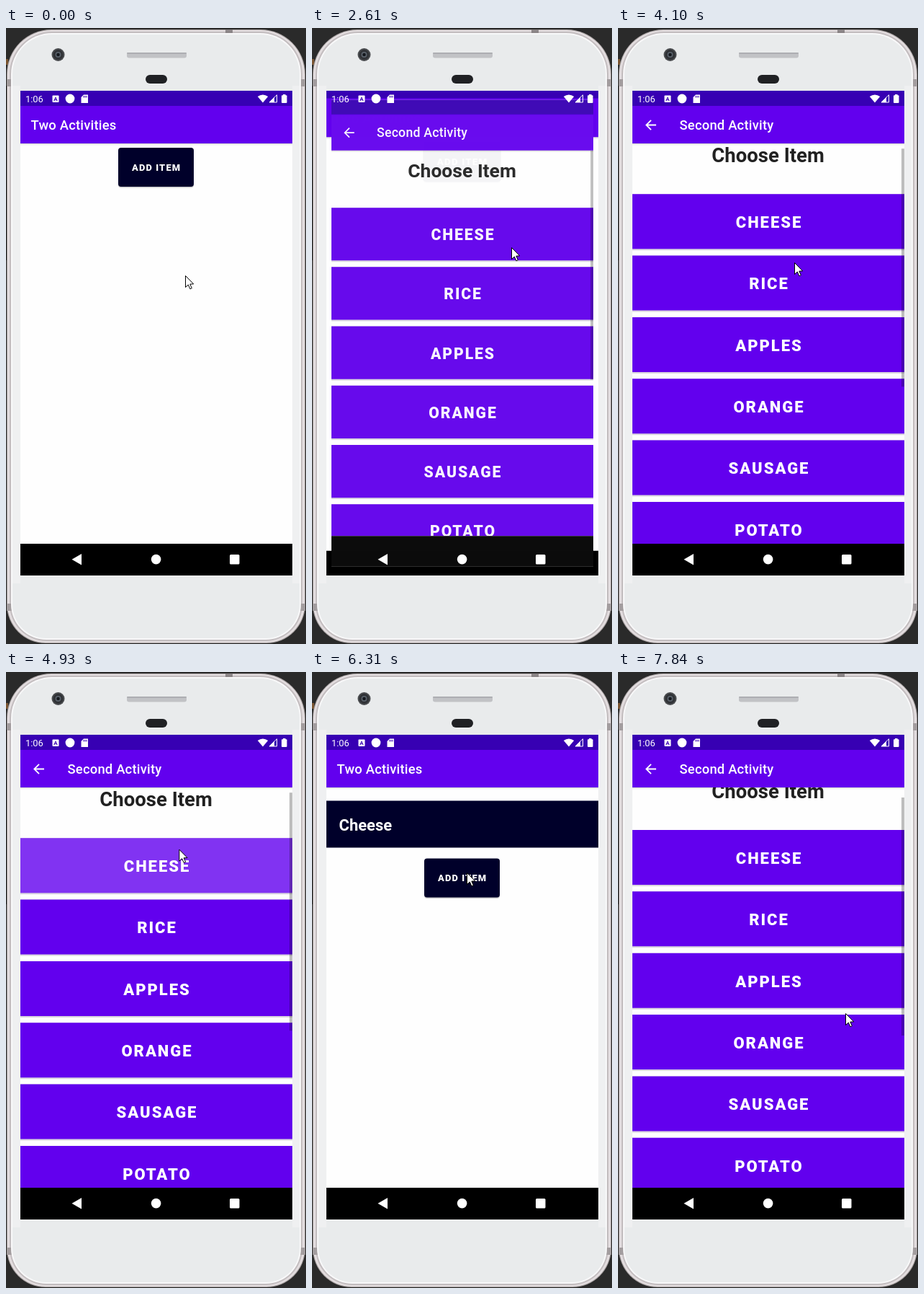
An HTML page with a canvas for the animation above (7.99 s loop, 417 by 854 pixels).

```html
<!DOCTYPE html>
<html lang="en">
<head>
<meta charset="utf-8">
<title>Two Activities</title>
<style>
html, body { margin: 0; width: 100%; height: 100%; overflow: hidden; background: #2a2a2a; }
canvas { display: block; width: 417px; height: 854px; }
</style>
</head>
<body>
<canvas id="stage" width="417" height="854"></canvas>
<script>
const ctx = document.getElementById('stage').getContext('2d');
const LOOP = 7990;
const STEP = 135; // the screen refreshes about this often, in ms
const PURPLE = '#6200ee', DARK_PURPLE = '#3700b3', NAVY = '#00002a', RIPPLE = 'rgba(255,255,255,.2)';
const ITEMS = ['CHEESE', 'RICE', 'APPLES', 'ORANGE', 'SAUSAGE', 'POTATO', 'TOMATO'];

const START = { x: 249, y: 343, scroll: 0 };
const MOVES = [
  { from: 140, to: 420, x: 298, y: 345 },
  { from: 560, to: 700, x: 170, y: 170 },
  { from: 840, to: 980, x: 219, y: 205 },
  { from: 1270, to: 1410, x: 219, y: 200 },
  { from: 2340, to: 2610, x: 277, y: 304 },
  { from: 3440, to: 4100, x: 245, y: 325, scroll: 12.3 },
  { from: 4230, to: 4630, x: 233, y: 247 },
  { from: 4930, to: 5210, x: 255, y: 243 },
  { from: 5350, to: 5910, x: 73, y: 203, scroll: 0 },
  { from: 6030, to: 6310, x: 215, y: 278 },
  { from: 6610, to: 6880, x: 250, y: 433 },
  { from: 7020, to: 7570, x: 214, y: 263, scroll: 23.5 },
  { from: 7690, to: 7840, x: 316, y: 473 },
];

// `age` is how far the transition has run when it first becomes visible
const TRANSITIONS = [
  { shown: 2475 + STEP, age: 96, opens: true },
  { shown: 5070, age: 45, opens: false },
  { shown: 6880 - STEP, age: 59, opens: true },
];

const clamp = v => Math.max(0, Math.min(1, v));

// Cursor and scroll position, advancing in whole refresh steps
function pointerAt(t) {
  const state = { ...START };
  for (const { from, to, ...goal } of MOVES) {
    if (t < from) break;
    const count = Math.round((to - from) / STEP);
    const step = Math.floor((t - from) / (to - from) * count + .01);
    const f = Math.min(1, (step + 1) / (count + 1));
    for (const key in goal) state[key] += (goal[key] - state[key]) * f;
  }
  return state;
}

// Fast-out, extra-slow-in: two joined cubic curves
function ease(x) {
  if (x <= 0 || x >= 1) return clamp(x);
  const [xs, ys] = x < 1 / 6
    ? [[0, .05, .1333, 1 / 6], [0, 0, .06, .4]]
    : [[1 / 6, .2083, .25, 1], [.4, .82, 1, 1]];
  const cubic = (p, u) => p[0] * (1 - u) ** 3 + 3 * p[1] * u * (1 - u) ** 2
    + 3 * p[2] * u * u * (1 - u) + p[3] * u ** 3;
  let lo = 0, hi = 1;
  for (let i = 0; i < 24; i++) {
    const mid = (lo + hi) / 2;
    if (cubic(xs, mid) < x) lo = mid; else hi = mid;
  }
  return cubic(ys, lo);
}

function rect(x, y, w, h, fill, radius = 0) {
  ctx.fillStyle = fill;
  ctx.beginPath();
  ctx.roundRect(x, y, w, h, radius);
  ctx.fill();
}

function disc(x, y, r, fill) {
  ctx.fillStyle = fill;
  ctx.beginPath();
  ctx.arc(x, y, r, 0, 7);
  ctx.fill();
}

function polygon(points, fill, stroke) {
  ctx.beginPath();
  points.forEach(([x, y]) => ctx.lineTo(x, y));
  ctx.closePath();
  ctx.fillStyle = fill;
  ctx.fill();
  if (stroke) {
    ctx.strokeStyle = stroke;
    ctx.lineWidth = 1;
    ctx.stroke();
  }
}

function text(str, x, y, size, weight, color, spacing = 0, align = 'left') {
  ctx.font = `${weight} ${size}px Roboto, sans-serif`;
  ctx.letterSpacing = spacing + 'px';
  ctx.textAlign = align;
  ctx.fillStyle = color;
  ctx.fillText(str, align === 'center' ? x + spacing / 2 : x, y);
}

function clipTo(x, y, w, h) {
  ctx.beginPath();
  ctx.rect(x, y, w, h);
  ctx.clip();
}

function phone() {
  rect(0, 0, 417, 854, '#2a2a2a');
  rect(0, 80, 1, 242, '#080808');
  rect(0, 43, 3, 8, '#7a5430');
  rect(1, 2, 415, 851, '#a59f9f', [62, 62, 54, 54]);
  rect(2, 3, 413, 849, '#e3dddf', [61, 61, 53, 53]);
  rect(5, 5, 407, 845, '#c3bdbf', [59, 59, 51, 51]);
  rect(305, 2, 10, 6, '#8b8587');
  for (const y of [71, 798]) {
    rect(1, y, 7, 10, '#a39d9f');
    rect(409, y, 7, 10, '#a39d9f');
  }
  rect(7, 7, 403, 841, '#f8f8f9', [57, 57, 49, 49]);
  rect(9, 9, 399, 837, '#e9ebec', [55, 55, 47, 47]);
  rect(9, 80, 11, 690, '#eff0f1');
  rect(398, 80, 10, 690, '#eff0f1');
  rect(168, 34, 83, 7.5, '#c1c2c5', 3);
  rect(168, 34, 83, 2, '#adaeb2', 2);
  rect(194, 65, 30, 12, '#202124', 6);
  disc(72.5, 37, 9, '#4a4c4f');
  disc(72.5, 37, 7, '#303236');
  disc(72.5, 37, 4, '#59616a');
  disc(72.5, 37, 2.3, '#15181d');
}

function appFrame(title, titleX) {
  rect(20, 87, 378, 22, DARK_PURPLE);
  rect(20, 108, 378, 52, PURPLE);
  rect(20, 160, 378, 1, 'rgba(0,0,0,.16)');
  rect(20, 161, 378, 1.5, 'rgba(0,0,0,.05)');
  rect(20, 715, 378, 44, '#000');
  text(title, titleX, 141, 18.4, 500, '#fff', .2);
}

function mainPage(hasItem, pressed) {
  rect(20, 87, 378, 672, '#fefefe');
  const top = hasItem ? 258.4 : 166;
  if (hasItem) {
    rect(20, 178.6, 378, 65, NAVY);
    text('Cheese', 37.5, 219.6, 22, 700, '#fff');
  }
  rect(156, top + 1, 105, 54.5, 'rgba(0,0,0,.2)', 4);
  rect(156, top, 105, 54, NAVY, 4);
  if (pressed) rect(156, top, 105, 54, RIPPLE, 4);
  text('ADD ITEM', 208.5, top + 32, 12.9, 900, '#fff', 1.15, 'center');
  appFrame('Two Activities', 34.5);
}

function listPage(scroll, pressed) {
  rect(20, 87, 378, 672, '#fefefe');
  ctx.save();
  clipTo(20, 160, 378, 555);
  text('Choose Item', 208.5, 198.5 - scroll, 27.5, 700, '#212121', 0, 'center');
  ITEMS.forEach((name, i) => {
    const y = 242.5 - scroll + i * 85.35;
    rect(20, y, 378, 78, '#d9d5de');
    rect(20, y, 378, 76, PURPLE);
    if (pressed && i === 0) rect(20, y, 378, 76, RIPPLE);
    text(name, 209, y + 46.8, 22, 900, '#fff', 1.97, 'center');
  });
  rect(394, 160 + scroll * .595, 4, 330, 'rgba(0,0,0,.26)');
  ctx.restore();
  appFrame('Second Activity', 85.5);
  ctx.strokeStyle = '#fff';
  ctx.lineWidth = 1.8;
  ctx.beginPath();
  ctx.moveTo(53, 134.5);
  ctx.lineTo(39.5, 134.5);
  ctx.moveTo(46, 127.8);
  ctx.lineTo(39.3, 134.5);
  ctx.lineTo(46, 141.2);
  ctx.stroke();
}

function scaled(scale, alpha, draw) {
  ctx.save();
  ctx.globalAlpha = alpha;
  ctx.translate(209, 423);
  ctx.scale(scale, scale);
  ctx.translate(-209, -423);
  clipTo(20, 87, 378, 672);
  draw();
  ctx.restore();
}

function pages(t, scroll) {
  const move = TRANSITIONS.filter(m => m.shown <= t).pop();
  const mainPressed = (t >= 2340 && t < 2700) || (t >= 6610 && t < 6950);
  const main = () => mainPage(t >= 5070, mainPressed);
  const list = () => listPage(scroll, t >= 4930 && t < 5200);
  if (!move) return main();
  const elapsed = move.age + STEP * Math.floor((t - move.shown) / STEP);
  const p = ease(elapsed / 400), fade = clamp((elapsed - 35) / 64);
  if (move.opens) {
    if (p < 1) scaled(1 + .05 * p ** 1.4, 1, main);
    scaled(.85 + .15 * p, fade, list);
  } else {
    scaled(1 + .1 * (1 - p) ** 1.3, 1, main);
    if (fade < 1) scaled(1 - .1 * p, 1 - fade, list);
  }
}

function systemIcons() {
  text('1:06', 27, 103, 12.9, 400, '#fff');
  rect(64.5, 93.5, 9, 9.5, '#fff', 1);
  text('A', 69, 101.3, 8, 700, DARK_PURPLE, 0, 'center');
  disc(89, 98, 6.4, '#fff');
  polygon([[108, 92.5], [114, 92.5], [114, 104], [104.5, 104], [104.5, 96]], '#fff');
  for (const x of [107.5, 109.5, 111.5]) rect(x, 94, 1, 2.5, DARK_PURPLE);
  ctx.fillStyle = '#fff';
  ctx.beginPath();
  ctx.moveTo(357, 103.5);
  ctx.lineTo(349.8, 95);
  ctx.quadraticCurveTo(357, 89.8, 364.2, 95);
  ctx.fill();
  polygon([[376.5, 92.8], [376.5, 103], [366, 103]], 'transparent', '#fff');
  polygon([[373, 96], [373, 103], [366, 103]], '#fff');
  rect(383, 93.3, 7.5, 10.7, '#fff', 1);
  rect(385, 92, 3.5, 2, '#fff');
  polygon([[91.5, 736.7], [105, 729], [105, 744.5]], '#fff');
  disc(208.6, 736.6, 6.8, '#fff');
  rect(311, 730, 13.5, 13.5, '#fff', 1.5);
}

function cursor(x, y) {
  const arrow = [[0, 0], [0, 16], [3.8, 12.5], [6.4, 18.3], [8.8, 17.2], [6.3, 11.6], [11.2, 11.4]];
  polygon(arrow.map(([dx, dy]) => [x + .5 + dx, y + .5 + dy]), '#fff', '#000');
}

function render(now) {
  const t = now % LOOP;
  const { x, y, scroll } = pointerAt(t);
  phone();
  ctx.save();
  clipTo(20, 87, 378, 672);
  pages(t, scroll);
  systemIcons();
  ctx.restore();
  cursor(x, y);
}

let origin;
function loop(now) {
  origin ??= now;
  render(Math.max(0, now - origin));
  requestAnimationFrame(loop);
}
render(0);
requestAnimationFrame(loop);
</script>
</body>
</html>
```
